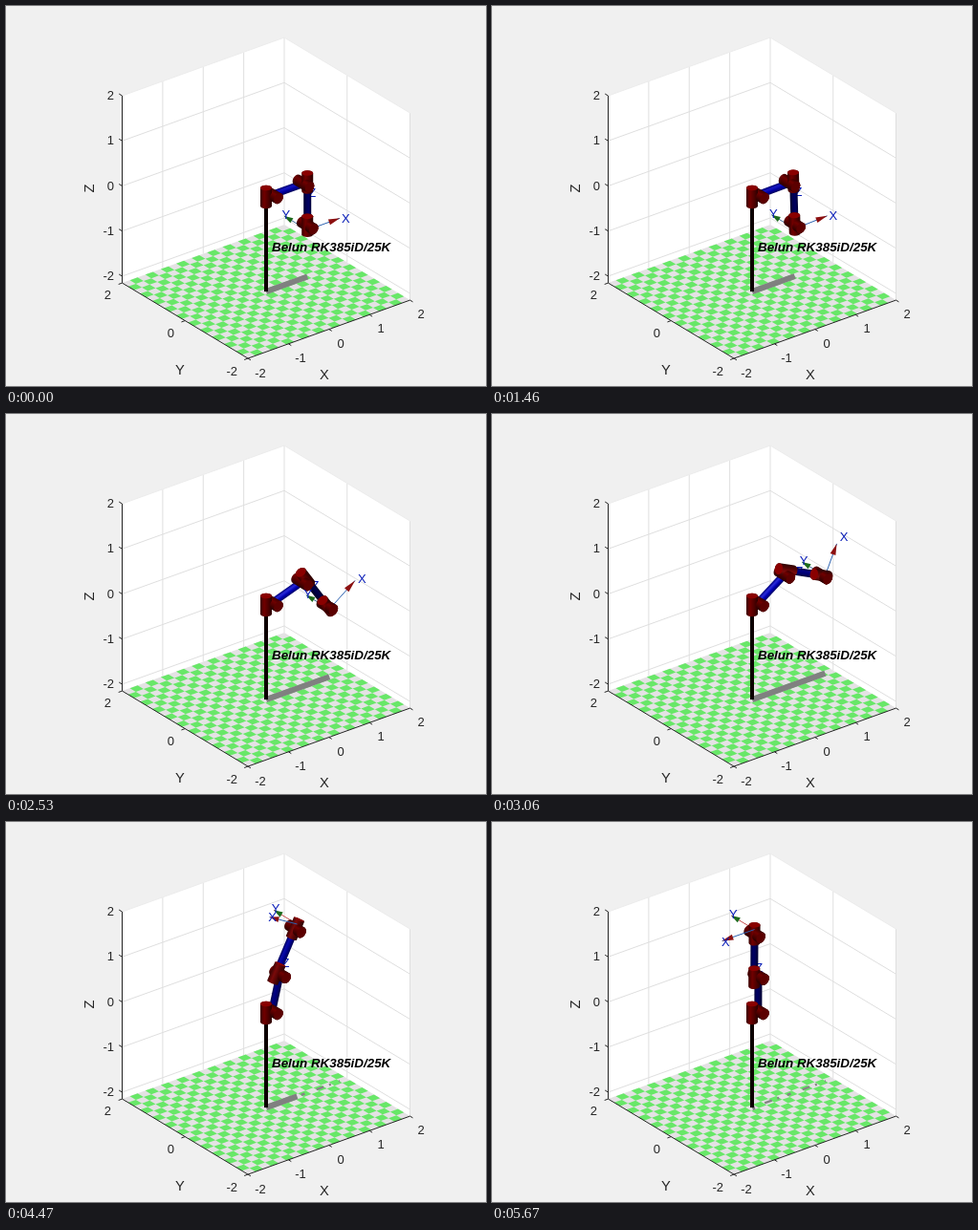
Recreate the animation shown at these times as an HTML page with a canvas. Size 502 by 398 pixels, loop 5740 ms.

```html
<!DOCTYPE html>
<html lang="en">
<head>
<meta charset="utf-8">
<title>Robot arm</title>
<style>
html, body { margin: 0; width: 100%; height: 100%; overflow: hidden; background: #f0f0f0; }
canvas { display: block; }
</style>
</head>
<body>
<canvas id="stage" width="502" height="398"></canvas>
<script>
const ctx = document.getElementById('stage').getContext('2d');
const LOOP = 5740, FLOOR = -2.15, TILES = 21, BASE_Z = -.053;
const SCALE = 53.5, RADIUS = 6, HALF = .2;
const FONT = '"Liberation Sans", Arial, sans-serif';

// Orthographic projection of the plot box
const project = ([x, y, z]) => [272 + 42.375 * x - 32.875 * y, 197.5 - 15.25 * x - 19.75 * y - 47.25 * z];
const along = (p, d, k) => p.map((v, i) => v + d[i] * k);

function path(points) {
  ctx.beginPath();
  points.forEach(p => ctx.lineTo(...project(p)));
}
function line(points, color, width = 1) {
  path(points);
  ctx.strokeStyle = color;
  ctx.lineWidth = width;
  ctx.stroke();
}
function fill(points, color) {
  path(points);
  ctx.fillStyle = color;
  ctx.fill();
}
function text(str, x, y, color = '#262626', size = 13, align = 'center', style = '') {
  ctx.font = `${style} ${size}px ${FONT}`;
  ctx.textAlign = align;
  ctx.textBaseline = 'alphabetic';
  ctx.fillStyle = color;
  ctx.fillText(str, x, y + size * 0.36);
}

function drawBox() {
  ctx.fillStyle = '#f0f0f0';
  ctx.fillRect(0, 0, 502, 398);
  fill([[-2, 2, 2], [2, 2, 2], [2, -2, 2], [2, -2, FLOOR], [-2, -2, FLOOR], [-2, 2, FLOOR]], '#fff');
  const grid = '#dfdfdf';
  for (const x of [-1, 0, 1, 2]) line([[x, 2, FLOOR], [x, 2, 2]], grid);
  line([[2, 0, FLOOR], [2, 0, 2]], grid);
  line([[2, -2, FLOOR], [2, -2, 2]], grid);
  for (let z = -2; z < 3; z++) line([[-2, 2, z], [2, 2, z], [2, -2, z]], z < 2 ? grid : '#ececec');

  fill([[-2, -2, FLOOR], [2, -2, FLOOR], [2, 2, FLOOR], [-2, 2, FLOOR]], '#e4e2e4');
  const size = 4 / TILES;
  for (let i = 0; i < TILES; i++) for (let j = 0; j < TILES; j++) {
    if ((i + j) % 2 === 0) continue;
    const x = -2 + i * size, y = -2 + j * size;
    fill([[x, y, FLOOR], [x + size, y, FLOOR], [x + size, y + size, FLOOR], [x, y + size, FLOOR]], '#68e768');
  }

  const ink = '#262626';
  line([[-2, 2, 2], [-2, 2, FLOOR], [-2, -2, FLOOR], [2, -2, FLOOR]], ink);
  for (let n = -2; n < 3; n++) {
    line([[n, -2, FLOOR], [n, -2.09, FLOOR]], ink);
    line([[-2, 2, n], [-2, 2.1, n]], ink);
    text(n, 350 + 42 * n, 353 - 15.5 * n);
    text(n, 113, 188 - 47.25 * n, ink, 13, 'right');
    if (n % 2 === 0) {
      line([[-2, n, FLOOR], [-2.09, n, FLOOR]], ink);
      text(n, 176 - 33 * n, 342 - 20 * n, ink, 13, 'right');
    }
  }
  text('X', 333, 386, ink, 14.7);
  text('Y', 182, 381, ink, 14.7);
  ctx.save();
  ctx.translate(87, 191);
  ctx.rotate(-Math.PI / 2);
  text('Z', 0, 0, ink, 14.7);
  ctx.restore();
}

// Solid cylinder; the end at `to` is the one whose cap faces the viewer
function cylinder(from, to, radius, shades, cap) {
  const [x0, y0] = project(from), [x1, y1] = project(to);
  const length = Math.hypot(x1 - x0, y1 - y0);
  const span = Math.hypot(...to.map((v, i) => v - from[i])) * SCALE;
  const minor = radius * Math.sqrt(Math.max(0, 1 - (length / span) ** 2));
  ctx.save();
  ctx.translate(x0, y0);
  ctx.rotate(Math.atan2(y1 - y0, x1 - x0));
  const side = ctx.createLinearGradient(0, -radius, 0, radius);
  shades.forEach((c, i) => side.addColorStop(i / (shades.length - 1), c));
  ctx.fillStyle = side;
  ctx.beginPath();
  ctx.ellipse(0, 0, minor, radius, 0, Math.PI / 2, Math.PI * 1.5);
  ctx.ellipse(length, 0, minor, radius, 0, -Math.PI / 2, Math.PI / 2);
  ctx.fill();
  if (cap) {
    ctx.fillStyle = cap;
    ctx.beginPath();
    ctx.ellipse(length, 0, minor, radius, 0, 0, Math.PI * 2);
    ctx.fill();
  }
  ctx.restore();
}

// Dark red shading, with a sheen between 0 and 1
function reds(sheen) {
  const tone = (r, gloss) => `rgb(${r + gloss * sheen},${gloss * sheen},${gloss * sheen})`;
  return [tone(58, 30), tone(112, 70), tone(80, 30), tone(42, 10)];
}

// A joint across the arm (along y) crossed by one along `axis`
function jointPair(cross, centre, axis) {
  const yAxis = [0, -1, 0];
  const sign = -.54 * axis[0] + .47 * axis[2] > 0 ? 1 : -1;
  const sheen = Math.cos(Math.atan2(axis[2], axis[0]) - .3) ** 6;
  cylinder(along(cross, yAxis, -HALF), along(cross, yAxis, HALF), RADIUS, reds(0), '#5c0000');
  cylinder(along(centre, axis, -HALF * sign), along(centre, axis, HALF * sign), RADIUS, reds(sheen), '#8a0000');
  cylinder(along(cross, yAxis, .07), along(cross, yAxis, HALF), RADIUS, reds(0), '#5c0000');
}

function link(from, to, angle) {
  const light = Math.cos(angle - .45) ** 2;
  const tone = (k, gloss = 0) => {
    const haze = gloss * light ** 4;
    return `rgb(${haze},${haze},${(65 + 135 * light) * k})`;
  };
  cylinder(from, to, 4, [tone(.6), tone(1.1, 45), tone(.9), tone(.5)]);
}

function arrow(origin, dir, reach, lineColor, headColor) {
  const [x0, y0] = project(origin), [x1, y1] = project(along(origin, dir, reach));
  line([origin, along(origin, dir, reach)], lineColor);
  ctx.save();
  ctx.translate(x1, y1);
  ctx.rotate(Math.atan2(y1 - y0, x1 - x0));
  const size = Math.hypot(x1 - x0, y1 - y0) * .33;
  ctx.fillStyle = headColor;
  ctx.beginPath();
  ctx.moveTo(0, 0);
  ctx.lineTo(-size, -3);
  ctx.lineTo(-size, 3);
  ctx.fill();
  ctx.restore();
}
function axisLabel(name, origin, dir) {
  const [x, y] = project(along(origin, dir, .83));
  text(name, x + 5, y, '#0a1eb8');
}

function drawShadow(reach, receding) {
  const base = [0, 0, FLOOR], tip = [reach, 0, FLOOR];
  if (receding) { // broken traces left where the shadow has been
    ctx.setLineDash([4, 13, 8, 6, 2, 9]);
    ctx.lineDashOffset = (reach - 1.8) * 45;
    line([tip, [1.82, 0, FLOOR]], '#858585', 2.5);
    ctx.setLineDash([]);
  }
  line([base, tip], '#808080', 6);
}

function drawArm(s) {
  const shoulderAngle = s * Math.PI / 2, turn = s * Math.PI;
  const toolX = [Math.cos(turn), 0, Math.sin(turn)];
  const forearm = [Math.sin(turn), 0, -Math.cos(turn)];
  const back = forearm.map(v => -v);
  const base = [0, 0, BASE_Z];
  const shoulder = along(base, [1, 0, 0], .15);
  const elbow = along(shoulder, [Math.cos(shoulderAngle), 0, Math.sin(shoulderAngle)], .77);
  const roll = along(elbow, toolX, .1);
  const wrist = along(roll, forearm, .96);
  const tool = along(wrist, forearm, .1);
  const drawX = () => arrow(tool, toolX, .6 + .2 * Math.abs(toolX[0]), '#2c62b0', '#8c1010');

  drawShadow(tool[0], turn > 1.25);
  line([[0, 0, FLOOR], base], '#0c0000', 4);
  arrow(tool, [0, 1, 0], .74, turn > 2.6 ? '#c85050' : '#40709a', '#1c6a1c');
  axisLabel('Z', tool, back);
  if (turn < 1.8) drawX();

  link(shoulder, elbow, shoulderAngle);
  link(elbow, roll, turn);
  link(roll, wrist, turn - Math.PI / 2);
  jointPair(shoulder, base, [0, 0, 1]);
  jointPair(elbow, roll, forearm);
  jointPair(wrist, wrist, forearm);

  if (turn >= 1.8) drawX();
  axisLabel('X', tool, toolX);
  axisLabel('Y', tool, [0, 1, 0]);
}

// Quintic easing in 47 even steps, shown on a 15 Hz clock
function progress(ms) {
  if (ms < 920) return 0;
  const tick = Math.floor((ms - 914) * .015);
  const step = Math.ceil((tick + .8) / 1.618) - 1;
  const t = step / 47;
  return t ** 3 * (10 - 15 * t + 6 * t * t);
}

function frame(now) {
  drawBox();
  drawArm(progress(now % LOOP));
  text('Belun RK385iD/25K', 278, 252.5, '#000', 13.4, 'left', 'italic bold');
  requestAnimationFrame(frame);
}
requestAnimationFrame(frame);
</script>
</body>
</html>
```
